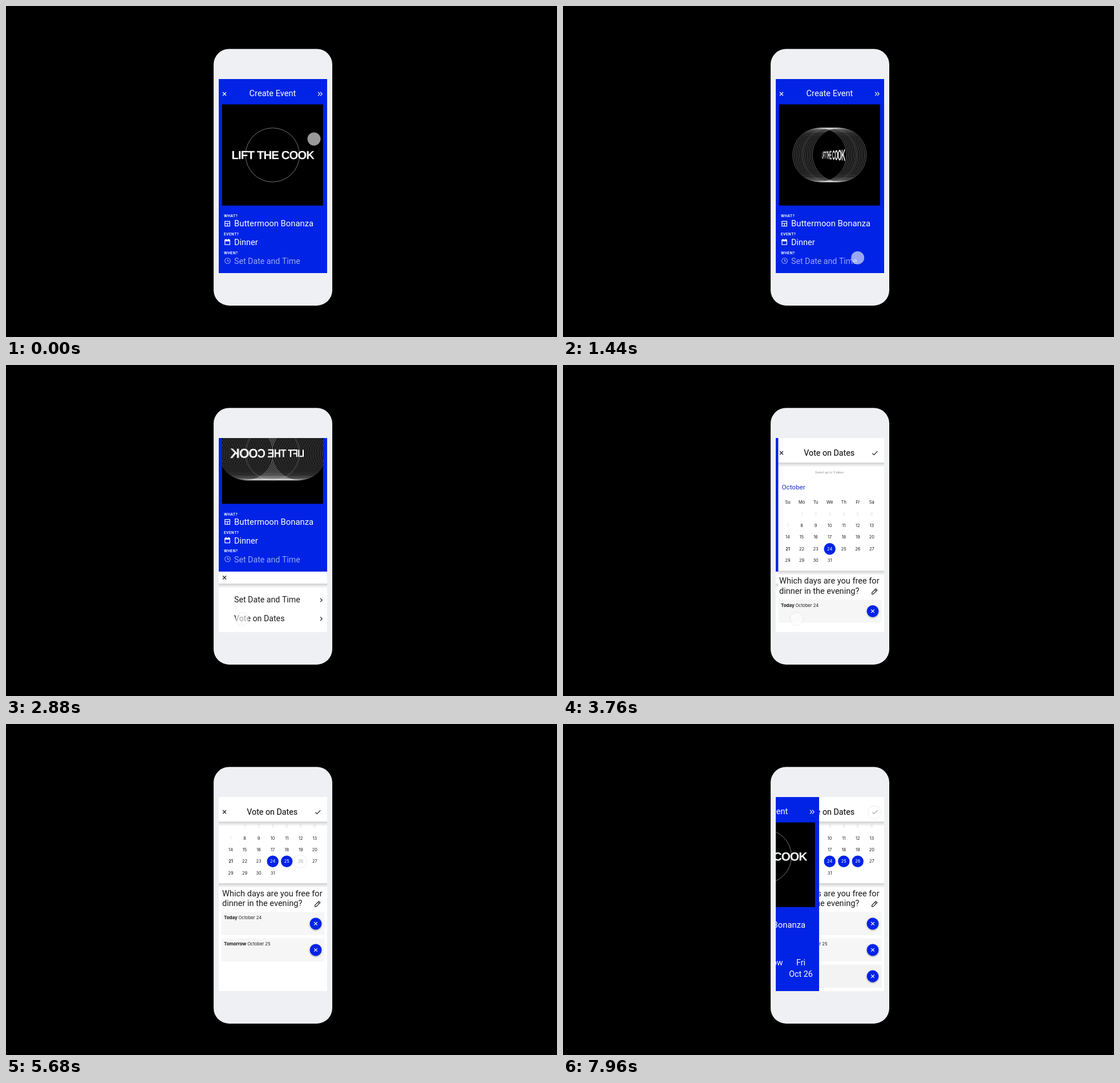
Recreate the animation shown at these times as an HTML page with a canvas. Size 966x580 px, loop 8000 ms.

```html
<!DOCTYPE html>
<html lang="en">
<head>
<meta charset="utf-8">
<title>Create Event</title>
<style>
html, body { margin: 0; width: 100%; height: 100%; overflow: hidden; background: #000; }
canvas { display: block; }
</style>
</head>
<body>
<canvas id="stage" width="966" height="580"></canvas>
<script>
const LOOP = 8000, SLIDE = 533;
const BLUE = '#0023e6', INK = '#1c1c1c', WHITE = '#fff';
const ROBOTO = 'Roboto, sans-serif', INTER = 'Inter, sans-serif';
const SCREEN = { x: 373, y: 128, w: 190, h: 340 };
const ART = { x: 378.7, y: 172.4, w: 177.1, h: 177.3 };
const HEAD_END = 172.5;
const ctx = document.getElementById('stage').getContext('2d');

// Touch moves: start, end, target
const START = [540, 233];
const MOVES = [
  [200, 1730, 516, 447],
  [2400, 3010, 410, 445],
  [3860, 4440, 491, 322],
  [5050, 5660, 516, 241],
  [6500, 7200, 546, 155]
];
const SHEET_AT = 2083, VOTE_AT = 3380, PICK2_AT = 4780, PICK3_AT = 6070, DONE_AT = 7877;

const clamp = v => Math.min(1, Math.max(0, v));
const part = (t, from, len) => clamp((t - from) / len);
const easeOut = u => 1 - (1 - u) ** 3;
const easeInOut = u => u < .5 ? 4 * u ** 3 : 1 - 4 * (1 - u) ** 3;

function text(s, x, y, size, color, { align = 'left', weight = 400, font = ROBOTO, gap = 0 } = {}) {
  ctx.font = `${weight} ${size}px ${font}`;
  ctx.textAlign = align;
  ctx.letterSpacing = gap + 'px';
  ctx.fillStyle = color;
  ctx.fillText(s, x, y + size * .356);
  const w = ctx.measureText(s).width;
  ctx.letterSpacing = '0px';
  return w;
}

function box(x, y, w, h, color) {
  ctx.fillStyle = color;
  ctx.fillRect(x, y, w, h);
}

function disc(x, y, r, color) {
  ctx.fillStyle = color;
  ctx.beginPath();
  ctx.arc(x, y, r, 0, 7);
  ctx.fill();
}

function ring(x, y, r, color, width) {
  ctx.strokeStyle = color;
  ctx.lineWidth = width;
  ctx.beginPath();
  ctx.arc(x, y, r, 0, 2 * Math.PI);
  ctx.stroke();
}

// Each line is a flat list of x, y pairs
function lines(color, width, ...list) {
  ctx.strokeStyle = color;
  ctx.lineWidth = width;
  ctx.beginPath();
  for (const p of list)
    for (let i = 0; i < p.length; i += 2) ctx[i ? 'lineTo' : 'moveTo'](p[i], p[i + 1]);
  ctx.stroke();
}

function clipped(x, y, w, h, draw) {
  ctx.save();
  ctx.beginPath();
  ctx.rect(x, y, w, h);
  ctx.clip();
  draw();
  ctx.restore();
}

function shadow(y, h = 8) {
  const g = ctx.createLinearGradient(0, y, 0, y + h);
  g.addColorStop(0, 'rgba(0,0,0,.19)');
  g.addColorStop(.45, 'rgba(0,0,0,.1)');
  g.addColorStop(1, 'rgba(0,0,0,0)');
  box(SCREEN.x, y, SCREEN.w, h, g);
}

function cross(x, y, color, r = 3) {
  lines(color, 1.2, [x - r, y - r, x + r, y + r], [x + r, y - r, x - r, y + r]);
}

// Headline bitmap, drawn large so that thin slices stay clean
const DETAIL = 4, HALF = 80;
const banner = document.createElement('canvas');
banner.width = HALF * 2 * DETAIL;
banner.height = 32 * DETAIL;
{
  const b = banner.getContext('2d');
  b.scale(DETAIL, DETAIL);
  b.font = '700 20.4px "Liberation Sans", sans-serif';
  b.letterSpacing = '-0.9px';
  b.textAlign = 'center';
  b.fillStyle = WHITE;
  b.fillText('LIFT THE COOK', HALF, 23.3);
}

// Turns the headline around its upright axis, column by column
function turnBanner(cx, cy, angle) {
  const depth = 236, c = Math.cos(angle), s = Math.sin(angle);
  const source = x => x * depth / (c * depth + x * s);
  ctx.imageSmoothingQuality = 'high';
  for (let x = -88; x < 88; x++) {
    const mid = source(x + .5);
    const zoom = depth / (depth - mid * s);
    if (Math.abs(mid) > HALF - 2 || zoom < 0) continue;
    const a = source(x), b = source(x + 1);
    const left = Math.max(0, (Math.min(a, b) + HALF) * DETAIL);
    const w = Math.min(Math.abs(b - a) * DETAIL, banner.width - left);
    if (w > 0 && w < 200)
      ctx.drawImage(banner, left, 0, w, banner.height, cx + x, cy - 16 * zoom, 1, 32 * zoom);
  }
}

function artwork(t, dy) {
  const cx = 467.3, cy = 261 + dy, r = 47.3, gray = 'rgba(255,255,255,.5)';
  box(ART.x, ART.y + dy, ART.w, ART.h, '#000');
  clipped(ART.x, ART.y + dy, ART.w, ART.h, () => {
    ring(cx, cy, r, gray, .9);
    for (let d = .0199 * (t - 585); d > 0; d -= 2.9)
      for (const side of [-1, 1]) ring(cx + side * d, cy, r, gray, .8);
    turnBanner(468, cy, (.0527 * t - 1) * Math.PI / 180);
  });
}

function createHeader(dy) {
  cross(383, 154 + dy, WHITE);
  text('Create Event', 467.5, 153 + dy, 14.6, WHITE, { align: 'center' });
  for (const x of [547, 551])
    lines(WHITE, 1.1, [x, 150.7 + dy, x + 3.2, 154 + dy, x, 157.3 + dy]);
}

function label(s, y) {
  text(s, 382, y, 6, WHITE, { weight: 700, font: INTER, gap: .45 });
}

function fields(dy) {
  label('WHAT?', 368 + dy);
  ctx.strokeStyle = WHITE;
  ctx.lineWidth = 1.2;
  ctx.strokeRect(383.8, 377.3 + dy, 8.6, 8.4);
  lines(WHITE, 1.2, [383.8, 381 + dy, 392.4, 381 + dy], [388.2, 381 + dy, 388.2, 385.7 + dy]);
  text('Buttermoon Bonanza', 400, 381 + dy, 14.8, WHITE);
  label('EVENT?', 400 + dy);
  ctx.strokeRect(383.8, 410 + dy, 8.6, 8.2);
  box(383.2, 409.4 + dy, 9.8, 3, WHITE);
  lines(WHITE, 1.2, [385.7, 408 + dy, 385.7, 411 + dy], [390.4, 408 + dy, 390.4, 411 + dy]);
  text('Dinner', 400, 414 + dy, 14.5, WHITE);
  label('WHEN?', 432.5 + dy);
}

function createScreen(t, dy) {
  box(SCREEN.x, SCREEN.y, SCREEN.w, SCREEN.h, BLUE);
  artwork(t, dy);
  createHeader(dy);
  fields(dy);
  const faded = 'rgba(255,255,255,.6)';
  ring(388.5, 446.5 + dy, 4.8, faded, 1.1);
  lines(faded, 1.1, [388.5, 443.5 + dy, 388.5, 446.9 + dy, 391.2, 446.9 + dy]);
  text('Set Date and Time', 400, 447 + dy, 14.2, faded);
  if (dy < 0) sheet(468.5 + dy);
}

function sheet(y) {
  box(SCREEN.x, y, SCREEN.w, 120, WHITE);
  shadow(y + 21);
  cross(383, y + 10.5, INK);
  ['Set Date and Time', 'Vote on Dates'].forEach((s, i) => {
    const mid = y + 49.3 + 32.7 * i;
    text(s, 400, mid, 14.2, INK);
    lines(INK, 1.2, [551, mid - 2.5, 554.2, mid + .7, 551, mid + 3.9]);
  });
}

const column = i => 394 + 24.55 * i;

function calendar(t, dy) {
  const opts = { align: 'center', font: INTER };
  text('Select up to 3 dates', 467, 188 + dy, 5.3, '#8a8a8a', opts);
  text('October', 383.5, 214 + dy, 11.7, '#1a2fc4');
  ['Su', 'Mo', 'Tu', 'We', 'Th', 'Fr', 'Sa'].forEach((s, i) =>
    text(s, column(i), 240.5 + dy, 7.5, INK, opts));
  const picked = { 24: -1000, 25: PICK2_AT, 26: PICK3_AT };
  for (let day = 1; day <= 31; day++) {
    const x = column(day % 7), y = 261 + 20.4 * Math.floor(day / 7) + dy;
    const on = day in picked ? easeOut(part(t, picked[day], 150)) : 0;
    if (on) disc(x, y, 10.2 * on, BLUE);
    const color = on ? WHITE : day < 8 ? '#dedede' : INK;
    text(day === 28 ? 29 : day, x, y, 7.4, color, { ...opts, weight: day === 21 ? 600 : 400 });
  }
}

function dateCard(name, date, y, color) {
  box(377.5, y, 181, 40.5, color);
  const w = text(name + ' ', 382, y + 10, 7.9, INK, { weight: 700, font: INTER });
  text(date, 382 + w, y + 10, 7.6, INK, { font: INTER });
  ctx.save();
  ctx.shadowColor = 'rgba(0,0,0,.4)';
  ctx.shadowBlur = 3;
  ctx.shadowOffsetY = 1;
  disc(543, y + 20.3, 10.4, BLUE);
  ctx.restore();
  cross(543, y + 20.3, WHITE, 2.8);
}

function pencil(x, y) {
  lines(INK, 1.2, [x - 4.5, y + 4.7, x - 4.2, y + 1.8, x + 2.4, y - 4.8, x + 4.8, y - 2.4,
    x - 1.8, y + 4.2, x - 4.5, y + 4.7], [x + .8, y - 3.1, x + 3.1, y - .8]);
}

function voteScreen(t) {
  const dy = -81.5 * easeOut(part(t, PICK2_AT, SLIDE));
  box(SCREEN.x, SCREEN.y, SCREEN.w, SCREEN.h, WHITE);
  clipped(SCREEN.x, 171, SCREEN.w, 297, () => {
    calendar(t, dy);
    shadow(360.5 + dy);
    text('Which days are you free for', 379, 378 + dy, 14.55, INK);
    text('dinner in the evening?', 379, 395.7 + dy, 14.55, INK);
    pencil(546, 397 + dy);
    dateCard('Today', 'October 24', 411 + dy, '#f6f6f6');
    const extra = [['Tomorrow', 'October 25', PICK2_AT, '#f6f6f6'], ['Friday', 'October 26', PICK3_AT, '#f3f3f3']];
    extra.forEach(([name, date, at, color], i) => {
      ctx.globalAlpha = part(t, at, 200);
      if (ctx.globalAlpha) dateCard(name, date, 457.1 + 46.1 * i + dy, color);
      ctx.globalAlpha = 1;
    });
    shadow(171);
  });
  cross(383, 154, INK);
  text('Vote on Dates', 466.7, 153.5, 14.25, '#000', { align: 'center' });
  lines(INK, 1.2, [542.3, 154.6, 545.2, 157.5, 551.3, 151.2]);
}

function resultScreen(t) {
  const dy = -29;
  box(SCREEN.x, SCREEN.y, SCREEN.w, SCREEN.h, BLUE);
  clipped(SCREEN.x, HEAD_END, SCREEN.w, 295.5, () => {
    artwork(t, dy);
    fields(dy);
    [['Today', 24], ['Tomorrow', 25], ['Fri', 26]].forEach(([name, day], i) => {
      const x = 403 + 64 * i;
      text(name, x, 418, 14.3, WHITE, { align: 'center' });
      text('Oct ' + day, x, 438, 14.3, WHITE, { align: 'center' });
    });
  });
  createHeader(0);
}

function touch(t) {
  let [x, y] = START;
  for (const [from, to, tx, ty] of MOVES) {
    const u = easeInOut(part(t, from, to - from));
    x += (tx - x) * u;
    y += (ty - y) * u;
  }
  disc(x, y, 11.5, 'rgba(255,255,255,.6)');
  ring(x, y, 11.5, 'rgba(0,0,0,.1)', .8);
}

function screens(t) {
  const wipe = easeOut(part(t, VOTE_AT, SLIDE));
  if (wipe < 1) createScreen(t, -106.5 * easeOut(part(t, SHEET_AT, SLIDE)));
  if (wipe > 0) {
    const w = SCREEN.w * wipe;
    clipped(SCREEN.x + SCREEN.w - w, SCREEN.y, w, SCREEN.h, () => voteScreen(t));
  }
  if (t > DONE_AT) {
    const shift = Math.round(SCREEN.w * (1 - easeOut(part(t, DONE_AT, SLIDE))));
    ctx.save();
    ctx.translate(-shift, 0);
    clipped(SCREEN.x, SCREEN.y, SCREEN.w, SCREEN.h, () => resultScreen(t - DONE_AT));
    ctx.restore();
  }
  touch(t);
}

function draw(t) {
  box(0, 0, 966, 580, '#000');
  ctx.fillStyle = '#eff0f3';
  ctx.beginPath();
  ctx.roundRect(364, 75.3, 208, 449.6, 27);
  ctx.fill();
  clipped(SCREEN.x, SCREEN.y, SCREEN.w, SCREEN.h, () => screens(t));
}

const begin = performance.now();
function tick() {
  draw((performance.now() - begin) % LOOP);
  requestAnimationFrame(tick);
}
tick();
</script>
</body>
</html>
```
